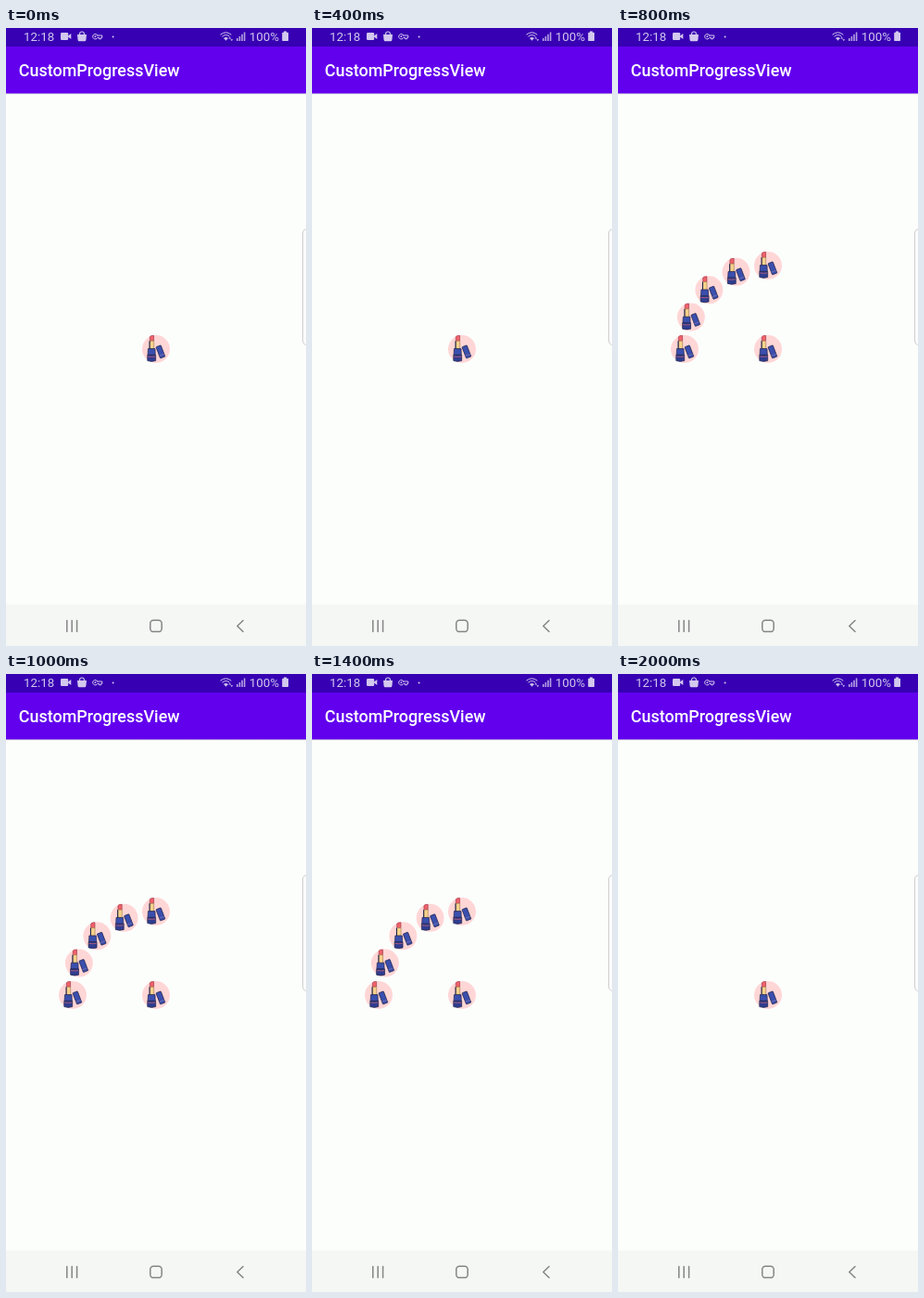
Recreate the animation shown at these times as an HTML page. Size 324x666 px, loop 2100 ms.

```html
<!DOCTYPE html>
<html lang="en">
<head>
<meta charset="utf-8">
<title>CustomProgressView</title>
<style>
  html, body { margin: 0; width: 100%; height: 100%; overflow: hidden; background: #fcfefc; }
  svg { display: block; width: 100vw; height: 100vh; }
  text { font-family: Roboto, "Open Sans", sans-serif; }
  .status { font-size: 13.3px; fill: #d3c8ee; }
  .title { font-size: 17.95px; font-weight: 500; fill: #fff; }
  .line { fill: none; stroke-linecap: round; stroke-linejoin: round; }
</style>
</head>
<body>
<svg viewBox="0 0 324 666">
  <defs>
    <linearGradient id="shade" x2="0" y2="1">
      <stop stop-color="#000" stop-opacity=".2"/>
      <stop offset="1" stop-color="#000" stop-opacity="0"/>
    </linearGradient>
    <g id="lipstick">
      <circle r="15" fill="#ffd6d6"/>
      <g stroke="#20234a" stroke-width=".7" stroke-linejoin="round">
        <g transform="translate(4.9 2.9) rotate(-21)">
          <rect x="-2.8" y="-6.5" width="5.6" height="13" rx=".5" fill="#3a4fae"/>
          <path d="M-2.8 3.6H2.8" stroke="#8474ae"/>
        </g>
        <path d="M-6.6 -8.7V-13.2Q-6.2 -14.6 -2.4 -14.6V-8.7Z" fill="#f0626a" stroke="#a33b4c"/>
        <path d="M-6.8 -8.7H-2.3V0H-6.8Z" fill="#f7d28a" stroke="#a98558"/>
        <path d="M-6.9 -8.7V0" stroke-width="1.1"/>
        <path d="M-8.5 -.4H-1L-.7 6.4H-8.9Z" fill="#3a4fae"/>
        <path d="M-9.2 6.4H-.3V12.6Q-4.7 14.2 -9.2 12.6Z" fill="#2f3d90"/>
        <path d="M-8.8 8Q-4.7 8.8 -.7 8" fill="none" stroke="#dc6676"/>
      </g>
    </g>
  </defs>

  <rect width="324" height="666" fill="#fcfefc"/>
  <rect y="70" width="324" height="2" fill="url(#shade)"/>
  <rect y="20" width="324" height="50.5" fill="#6200ee"/>
  <rect width="324" height="20" fill="#3700b3"/>

  <text class="status" x="19" y="14">12:18</text>
  <text class="status" x="262.8" y="14">100%</text>
  <text class="title" x="13.8" y="52">CustomProgressView</text>

  <g fill="#d3c8ee" stroke="#d3c8ee" stroke-width="0">
    <rect x="59" y="5" width="8.2" height="8" rx="1.2"/>
    <path d="M67 8.4L70.3 6V12L67 9.6Z"/>
    <path d="M77 7H87L86.4 13Q86.2 14.3 85 14.3H79Q77.8 14.3 77.6 13Z"/>
    <path class="line" d="M79.6 7V6Q79.8 4 82 4T84.4 6V7" stroke-width="1.2"/>
    <path class="line" d="M98.8 8H103.8V10.4H102.6V11.8H100.6V10.4H98.8A2.7 2.7 0 1 1 98.8 8Z" stroke-width="1"/>
    <circle cx="96.4" cy="9.2" r=".9"/>
    <circle cx="115.6" cy="9.5" r="1"/>
    <path class="line" d="M231.8 7Q237.5 2.4 243 7M233.8 9Q237.5 5.8 241.2 9M235.6 11Q237.5 9.4 239.4 11" stroke-width="1"/>
    <path d="M235.6 11.2Q237.5 10 239.4 11.2L237.5 13.8Z"/>
    <path d="M240.4 11.6L241.8 9.8L243.2 11.6ZM242.4 12.2H245.2L243.8 14Z"/>
    <path d="M249 11h1.6v3h-1.6zM251.6 9h1.6v5h-1.6zM254.2 6.8h1.6v7.2h-1.6zM256.8 4.5h1.6v9.5h-1.6z" opacity=".8"/>
    <path d="M300 3.6H303V4.8H304.3Q305 4.8 305 5.5V13.3Q305 14 304.3 14H298.9Q298.2 14 298.2 13.3V5.5Q298.2 4.8 298.9 4.8H300Z"/>
  </g>

  <path d="M325 217H323.5Q320.5 217.5 320.5 221V337Q320.5 340.5 323.5 341.5H325" fill="#fbfbfb" stroke="#cfcfcf"/>

  <g id="ring"></g>
  <use href="#lipstick" x="162" y="346"/>

  <rect y="621.5" width="324" height="44.5" fill="#f5f7f5"/>
  <g class="line" stroke="#858585" stroke-width="1.5">
    <path d="M65.8 638.5V650.5M71.2 638.5V650.5M76.6 638.5V650.5"/>
    <rect x="155.8" y="638.2" width="12.4" height="12.4" rx="3.4"/>
    <path d="M256 638.5L249.8 644.5L256 650.5"/>
  </g>
</svg>

<script>
  const LOOP = 2100, STEP = 100, RADIUS = 90;
  const OPEN = 350, CLOSE = 1650, DURATION = 300;
  const ring = document.getElementById("ring");

  const items = [0, 1, 2, 3, 4].map(i => {
    const el = document.createElementNS("http://www.w3.org/2000/svg", "use");
    el.setAttribute("href", "#lipstick");
    ring.append(el);
    return { el, angle: Math.PI * (0.5 + i / 8) };
  });

  // Ease in and out between 0 and 1.
  function ease(time, start) {
    const p = Math.min(1, Math.max(0, (time - start) / DURATION));
    return (1 - Math.cos(p * Math.PI)) / 2;
  }

  function draw(now) {
    const time = Math.floor((now % LOOP) / STEP) * STEP;
    const spread = ease(time, OPEN) - ease(time, CLOSE);
    for (const { el, angle } of items) {
      const x = 162 + Math.cos(angle) * RADIUS * spread;
      const y = 346 - Math.sin(angle) * RADIUS * spread;
      el.setAttribute("transform", `translate(${x} ${y}) scale(${spread})`);
    }
    ring.style.visibility = spread > 0 ? "visible" : "hidden";
  }

  function tick() {
    draw(performance.now());
    requestAnimationFrame(tick);
  }
  tick();
</script>
</body>
</html>
```
